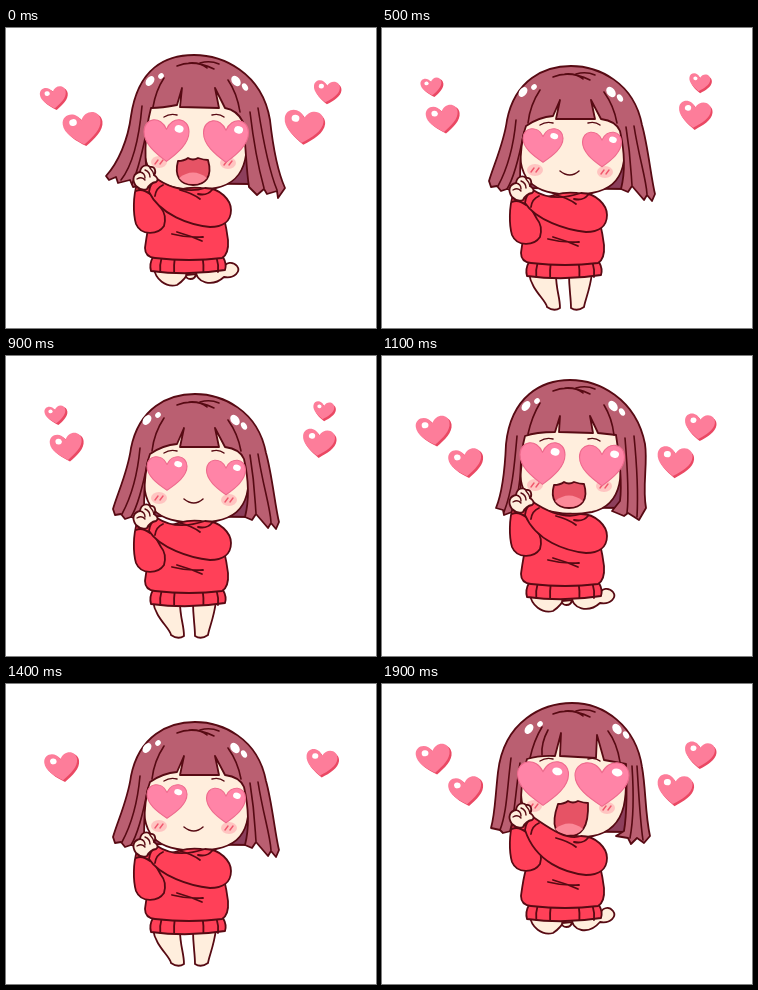
An HTML page that plays this animation: 370x300 px, repeating every 2000 ms.

```html
<!DOCTYPE html>
<html lang="en">
<head>
<meta charset="utf-8">
<title>Heart eyes</title>
<style>
html, body { margin: 0; width: 100%; height: 100%; overflow: hidden; background: #fff; }
svg { display: block; width: 370px; height: 300px; }
.pose { display: none; stroke: #570a13; stroke-width: 1.8; stroke-linejoin: round; stroke-linecap: round; }
.line { fill: none; }
.hair { fill: #ba5f71; }
.skin { fill: #ffeedd; }
.red { fill: #ff4058; }
.shine { fill: #fff; stroke: none; }
</style>
</head>
<body>
<svg id="stage" viewBox="0 0 370 300"></svg>
<script>
const STEP = 100, COUNT = 20;
const HEART = 'M0,.9C-.5,.55 -1,.15 -1,-.35C-1,-.95 -.25,-1.05 0,-.45C.25,-1.05 1,-.95 1,-.35C1,.15 .5,.55 0,.9Z';

const path = (cls, d, extra = '') => `<path class="${cls}" d="${d}" ${extra}/>`;
const oval = (x, y, rx, ry, turn = 0, cls = 'shine', extra = '') =>
  `<ellipse class="${cls}" rx="${rx}" ry="${ry}" transform="translate(${x} ${y}) rotate(${turn})" ${extra}/>`;

function eyeHeart(x, y, w, h) {
  return `<g transform="translate(${x} ${y})">
    <path d="${HEART}" transform="scale(${w / 2} ${h / 1.73})" fill="#ff84a7" stroke="#ee6a8d" stroke-width="1.1" vector-effect="non-scaling-stroke"/>
    ${oval(w * .28, -h * .27, w * .1, h * .09, 15)}</g>`;
}

function floatHeart(x, y, w, tilt) {
  const s = w / 2 - 1;
  return `<g transform="translate(${x} ${y + 1}) rotate(${tilt})">
    <path d="${HEART}" transform="translate(1.2 1.3) scale(${s} ${s * .94})" fill="#ea4863"/>
    <path d="${HEART}" transform="translate(-.6 -.6) scale(${s} ${s * .94})" fill="#fd7d9a"/>
    ${oval(-s * .48, -s * .4, s * .2, s * .18)}</g>`;
}

function blush(x, y) {
  return oval(x, y, 8, 6, 0, '', 'fill="#ffaeb2" fill-opacity=".65" stroke="none"') +
    path('line', `M${x - 4},${y + 2}l3,-4m2,4l3,-4`, 'stroke="#f0566c" stroke-width="1.4"');
}

function face(p) {
  const { left: l, right: r, brow: b, chin: c } = p;
  return path('skin', `M${l + 4},${b - 24}C${l - 6},${b + 40} ${l - 1},${c - 7} ${l + 33},${c - 1}` +
    `Q${l + 52},${c + 3} ${l + 72},${c - 1}C${r + 2},${c - 8} ${r + 4},${b + 38} ${r - 3},${b - 24}Z`);
}

function openMouth(top, bottom, lean = 0) {
  const l = 172 + lean, r = 202 + lean;
  return path('', `M${l},${top + 3}Q${l + 6},${top + 3} ${l + 10},${top}Q${l + 15},${top + 3} ${l + 20},${top}Q${r - 4},${top + 2} ${r},${top + 2}` +
      `C207,${bottom - 8} 199,${bottom} 187,${bottom}C174,${bottom} 168,${bottom - 9} ${l},${top + 3}Z`, 'fill="#e65365"') +
    path('', `M173,${bottom - 7}Q187,${bottom - 18} 201,${bottom - 7}Q196,${bottom - 1} 187,${bottom - 1}Q178,${bottom - 1} 173,${bottom - 7}Z`, 'fill="#fb8998" stroke="none"');
}

function features(p) {
  const { brow: b } = p;
  let s = path('line', `M158,${b + 2}q6,-4 13,-2M206,${b}q7,-2 12,2`, 'stroke-width="1.4"');
  s += blush(...p.cheeks[0]) + blush(...p.cheeks[1]);
  if (p.eyes) s += p.eyes.map(e => eyeHeart(...e)).join('');
  else s += path('line', 'M141,121Q155,117 172,121M202,121Q217,117 231,120', 'stroke-width="4.4"');
  if (p.mouth) s += openMouth(...p.mouth);
  else if (p.eyes) s += path('line', 'M178,143Q188,151 197,143', 'stroke-width="1.5"');
  else s += path('', 'M169,142Q177,142 184,139Q192,142 199,142C198,150 192,154 184,154C176,154 171,150 169,142Z', 'fill="#e65365"') +
    path('', 'M172,149Q184,142 197,148Q192,153 184,153Q176,153 172,149Z', 'fill="#fb8998" stroke="none"');
  return s;
}

function hair(p) {
  const t = p.top, x = p.shineX, y = t + 26;
  return path('hair', p.hair) +
    path('line', p.strands + `M171,${t + 11}Q187,${t + 4} 208,${t + 14}M183,${t + 8}Q194,${t + 7} 201,${t + 13}M194,${t + 8}Q204,${t + 5} 213,${t + 9}`, 'stroke-width="1.6"') +
    oval(x, y, 3.7, 5.5, 38) + oval(x + 11, y - 5, 2.5, 3, 50) +
    oval(p.shineR, y, 4, 5.8, -38) + oval(p.shineR + 9, y + 6, 2.6, 4, -32);
}

function skirt(s, l, r) {
  const pleats = [.14, .32, .7, .89].map(k =>
    `M${l + (r - l) * k},${s + 2}q${(k - .5) * 5},6 ${(k - .5) * 3},13`).join('');
  return path('red', `M${l + 2},${s}Q${(l + r) / 2},${s + 5} ${r - 2},${s}Q${r + 2},${s + 7} ${r},${s + 13}Q${(l + r) / 2},${s + 19} ${l},${s + 14}Q${l - 2},${s + 7} ${l + 2},${s}Z`) +
    path('line', pleats);
}

const kneel = (s, lift = 0) => path('skin',
  `M148,${s + 11}C149,${s + 22} 160,${s + 31} 171,${s + 28}Q179,${s + 23} 184,${s + 13}Z` +
  `M180,${s + 18}C179,${s + 23} 189,${s + 24} 190,${s + 17}Z` +
  `M190,${s + 12}C189,${s + 27} 207,${s + 30} 218,${s + 20 - lift}C229,${s + 22 - lift} 235,${s + 14 - lift} 231,${s + 9 - lift}C227,${s + 4 - lift} 219,${s + 5 - lift} 218,${s + 11}Z`);

// Tapering legs: each runs from a wide top to a small foot
const stand = (s, legs) => path('skin', legs.map(([outer, inner, foot]) => {
  const d = Math.sign(inner - outer);
  return `M${outer},${s + 11}C${outer + d * 2},${s + 28} ${foot - d * 8},${s + 38} ${foot - d * 7},${s + 45}` +
    `Q${foot},${s + 50} ${foot + d * 6},${s + 46}C${foot + d * 6},${s + 35} ${inner},${s + 28} ${inner},${s + 12}Z`;
}).join(''));

function claspedBody(s, h, legs) {
  const y = s - 229;
  return legs + skirt(s, 145, 219) +
    path('red', `M157,${y + 168}C143,${y + 185} 141,${y + 205} 139,${y + 220}Q139,${y + 229} 149,${y + 230}Q184,${y + 234} 216,${y + 230}Q223,${y + 226} 222,${y + 212}C220,${y + 196} 216,${y + 180} 211,${y + 165}Q187,${y + 153} 157,${y + 168}Z`) +
    path('line', `M166,${y + 206}q15,4 31,3M171,${y + 204}q14,4 25,9`) +
    path('red', `M131,${h + 10}C127,${h + 22} 127,${h + 40} 130,${h + 50}C135,${h + 62} 152,${h + 61} 158,${h + 52}Q161,${h + 41} 155,${h + 34}L143,${h + 13}Z`) +
    path('line', `M130,${h + 17}q6,-3 14,3`) +
    path('red', `M151,${h + 5}C166,${h + 15} 184,${y + 165} 199,${y + 160}C214,${y + 160} 225,${y + 172} 225,${y + 182}C225,${y + 194} 216,${y + 199} 204,${y + 199}C184,${y + 197} 154,${y + 187} 143,${h + 18}Q144,${h + 9} 151,${h + 5}Z`) +
    path('line', `M149,${h + 22}q1,-8 8,-11M174,${y + 162}q12,3 20,9M206,${y + 162}q-5,6 -14,4`) +
    path('skin', `M130,${h + 12}C125,${h + 5} 128,${h - 1} 134,${h - 2}C135,${h - 9} 141,${h - 10} 144,${h - 7}C150,${h - 8} 150,${h - 1} 148,${h + 1}Q154,${h + 5} 150,${h + 8}Q144,${h + 9} 141,${h + 15}Q135,${h + 17} 130,${h + 12}Z`) +
    path('line', `M134,${h - 2}q5,1 5,6M139,${h - 4}q5,2 5,7M144,${h - 6}q3,3 4,7M131,${h + 5}q5,-3 8,1`, 'stroke-width="1.4"');
}

function openBody() {
  const hand = (x, d) => path('skin', `M${x},190l${-d * 5},3l${-d * 5},-3q${-d * 3},1 ${-d},4q${-d * 4},1 ${-d},4q${-d * 2},3 ${d},4q0,4 ${d * 5},2l${d * 7},0Z`);
  return stand(234, [[151, 182, 172], [222, 196, 200]]) + skirt(234, 146, 226) + hand(119, 1) + hand(253, -1) +
    path('red', 'M160,164C146,169 130,183 114,187Q116,196 120,204Q135,204 147,199C146,212 141,220 141,227Q141,234 152,235Q186,239 220,235Q230,233 229,226Q224,211 225,199Q239,205 253,202Q257,196 257,187C241,183 226,169 211,164Z') +
    path('red', 'M157,167Q157,162 164,162Q187,174 207,162Q213,163 213,167Q204,175 187,174Q168,175 157,167Z') +
    path('line', 'M147,199q-1,-4 1,-7M225,199q1,-4 -1,-7M121,186q2,9 6,17M250,186q-1,9 -5,17M163,204q13,1 39,13M171,211q13,1 30,2') +
    path('line', 'M186,174Q180,178 178,185M188,174Q194,177 197,184', 'stroke-width="4.4" stroke-linecap="butt" stroke="#350910"');
}

const poses = {
  fall: {
    top: 27, left: 138, right: 241, brow: 87, chin: 161, shineX: 144, shineR: 230,
    hair: 'M188,27C160,27 132,40 125,88C122,112 112,135 100,148L103,152L110,149L112,155L124,152L127,159L143,156C138,135 138,107 145,80Q156,80 171,77L176,60L174,79L213,80L209,60L219,80Q231,82 237,94C240,118 240,140 243,159L251,167L258,161L261,166L271,163L272,170L279,160C270,140 266,110 264,92C256,44 216,27 188,27Z',
    strands: 'M136,78C133,112 126,138 115,152M142,96C137,122 133,140 126,156M158,50Q150,62 147,79M244,84C248,118 253,142 258,160M252,80C258,118 264,145 271,162M222,52Q231,65 234,84',
    cheeks: [[153, 134], [222, 135]], eyes: [[160.5, 112, 45, 41], [220, 113, 45, 41]], mouth: [130, 157],
    body: claspedBody(229, 146, kneel(229))
  },
  rise: {
    top: 24, left: 138, right: 239, brow: 83, chin: 157, shineX: 144, shineR: 231,
    hair: 'M188,24C160,24 129,40 124,88C123,112 121,135 114,152L121,154L122,159L130,156L141,162C138,135 137,102 143,80Q154,76 173,76L178,60L177,76L211,77L208,60L216,77L234,79C238,102 240,130 238,145L230,155L242,160L246,157L257,164L264,152C260,130 266,108 263,88C254,42 216,24 188,24Z',
    strands: 'M135,80C132,115 130,135 122,156M141,100C137,125 137,142 131,156M158,47Q150,60 146,78M243,82C246,118 247,140 245,157M252,80C256,120 256,142 255,161M222,49Q230,62 232,79',
    cheeks: [[153, 129], [222, 130]], eyes: [[160.5, 107, 45, 41], [220, 109, 45, 40]], mouth: [126, 152],
    body: claspedBody(227, 141, kneel(227))
  },
  apex: {
    top: 19, left: 139, right: 244, brow: 75, chin: 153, shineX: 147, shineR: 235,
    hair: 'M190,19C162,19 122,36 116,88C113,115 113,130 109,144L118,146L121,149L129,147L141,152C137,120 139,95 145,75Q158,71 173,72L179,49L178,72L214,74L215,51L222,76L244,80C245,98 245,130 242,147L234,152L246,154L249,160L255,154L262,159L268,152C263,130 264,105 260,83C254,42 222,19 190,19Z',
    strands: 'M129,74C125,105 125,128 118,146M138,79C133,110 133,130 128,147M160,43Q152,56 148,74M166,46Q159,59 160,71M250,82C252,112 251,138 248,154M255,82C257,112 258,137 261,156M226,47Q235,59 238,78',
    cheeks: [[152, 122], [225, 124]], eyes: [[161, 99, 51, 43], [220, 100, 54, 43]], mouth: [117, 152, 4],
    body: claspedBody(221, 128, kneel(221, 3))
  },
  land: {
    top: 38, left: 138, right: 243, brow: 95, chin: 166, shineX: 141, shineR: 229,
    hair: 'M189,38C162,38 133,52 125,92C122,115 112,136 107,153L109,159L115,158L119,163L125,161L138,165C138,140 138,114 144,98Q157,89 171,88L178,72L174,91L213,91L209,72L219,91Q234,93 238,103C243,125 243,145 239,161L246,164L250,158L262,172L265,167L270,173L273,166C269,150 266,118 260,97C252,54 216,38 189,38Z',
    strands: 'M134,92C131,125 123,145 116,158M142,104C137,130 132,150 125,161M158,62Q148,77 146,95M244,99C249,130 249,146 250,157M252,98C257,130 264,150 265,166M222,64Q232,78 235,95',
    cheeks: [[153, 142], [223, 144]], eyes: [[161, 117, 40, 33], [220, 121, 39, 34]],
    body: claspedBody(234, 157, stand(234, [[147, 174, 172], [210, 187, 195]]))
  },
  open: {
    top: 29, left: 134, right: 238, brow: 93, chin: 165, shineX: 134, shineR: 226,
    hair: 'M186,29C160,29 122,44 113,92C110,120 103,143 101,158L104,164L109,160L113,166L119,164L124,168L139,165C136,140 134,115 134,97Q146,87 161,86L169,60L164,87L204,85L200,60L211,86Q230,88 240,97C240,120 239,143 235,163L232,166L242,168L248,164L255,168L260,163L267,169L270,160C268,143 264,125 259,100C250,45 214,29 186,29Z',
    strands: 'M126,92C122,125 112,148 109,160M132,102C128,132 122,148 119,164M137,135Q133,152 132,165M155,54Q143,70 140,91M161,58Q151,72 149,87M246,96C246,130 247,147 248,163M251,96C253,130 257,148 260,162M213,55Q225,70 232,91',
    cheeks: [[148, 139], [222, 139]], body: openBody()
  }
};

// [x, y, width] along each side's upward drift, one entry per step
const trails = [
  [[84, 106, 35], [77, 100, 40], [61, 90, 34], [56, 82, 35], [52, 74, 36], [48, 69, 28], [50, 58, 23]],
  [[293, 105, 37], [298, 98, 41], [313, 86, 34], [316, 78, 33], [318, 70, 32], [321, 63, 28], [318, 54, 23]]
];

const motion = [
  ['fall'], ['land'], ['open'], ['open'], ['open'], ['land'], ['rise'], ['apex'], ['fall'], ['land'],
  ['land'], ['rise'], ['apex'], ['fall'], ['land'], ['land'], ['rise'], ['rise', -5], ['apex', -4], ['apex']
];

const stage = document.getElementById('stage');
stage.innerHTML = '<g id="hearts"></g>' + Object.entries(poses).map(([name, p]) =>
  `<g class="pose" id="${name}">` +
  path('', `M${p.left + 8},${p.chin - 45}L${p.left + 5},${p.chin - 6}L${p.right + 4},${p.chin - 5}L${p.right},${p.chin - 45}Z`, 'fill="#8d3f5c"') +
  (p.eyes ? '' : p.body) + face(p) + hair(p) + features(p) + (p.eyes ? p.body : '') + '</g>').join('');

const hearts = document.getElementById('hearts');
const groups = Object.keys(poses).map(name => document.getElementById(name));
let shown = -1;

function draw() {
  const i = Math.floor(performance.now() / STEP) % COUNT;
  if (i !== shown) {
    shown = i;
    const [name, dy = 0] = motion[i];
    for (const g of groups) g.style.display = g.id === name ? 'block' : 'none';
    document.getElementById(name).setAttribute('transform', `translate(0 ${dy})`);
    const phase = (i + 1) % 4;
    hearts.innerHTML = name === 'open' ? '' : trails.map((trail, side) =>
      trail.filter((_, k) => k % 4 === phase).map(h => floatHeart(...h, side ? 6 : -7)).join('')).join('');
  }
  requestAnimationFrame(draw);
}
draw();
</script>
</body>
</html>
```
